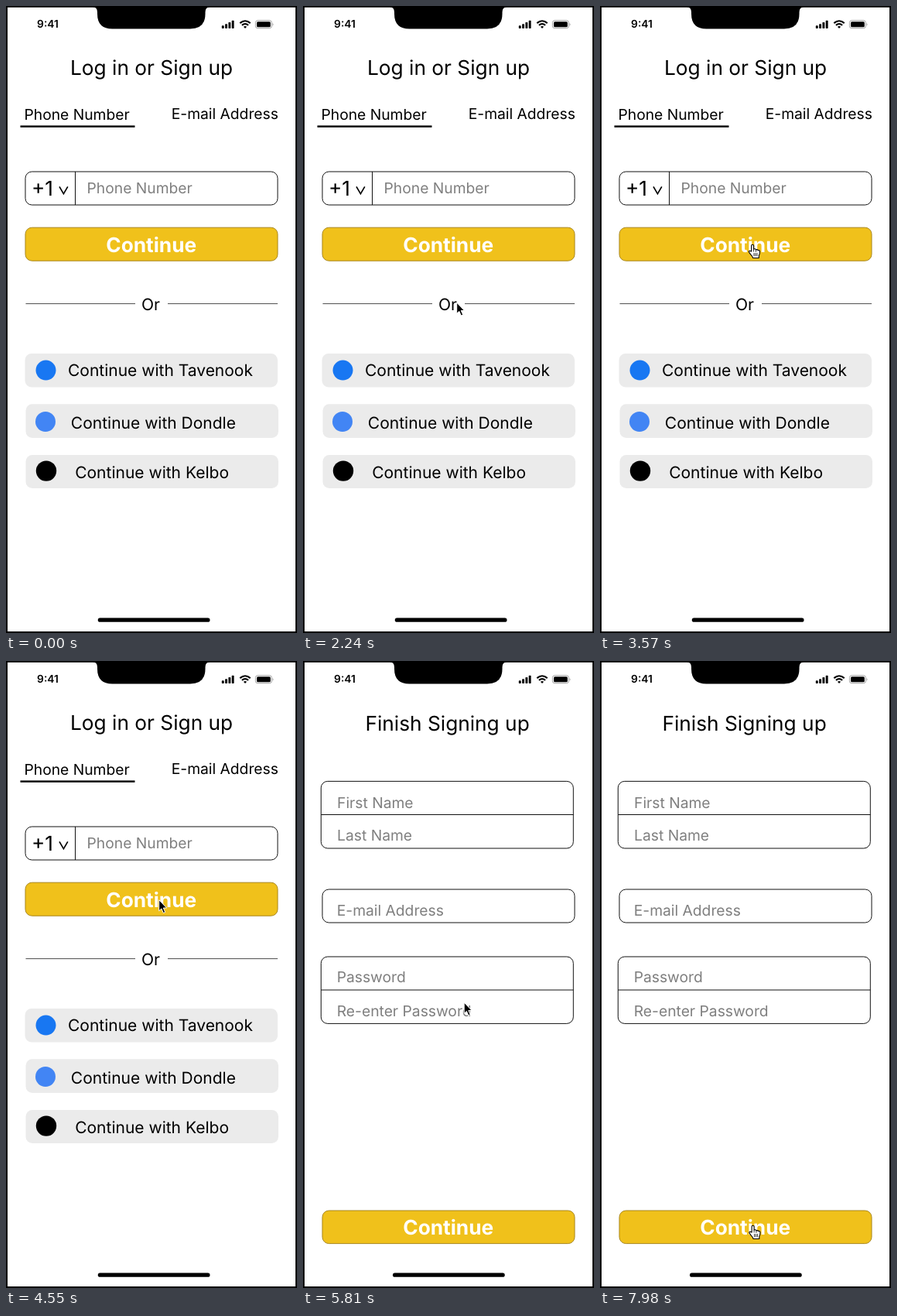
An HTML page for the animation above (8 s loop, 376 by 810 pixels).

```html
<!DOCTYPE html>
<html lang="en">
<head>
<meta charset="utf-8">
<title>Log in or Sign up</title>
<style>
  html, body { margin: 0; width: 100%; height: 100%; overflow: hidden; background: #fff; }
  svg { display: block; width: 376px; height: 810px; }
  text { font-family: Inter, Roboto, sans-serif; font-optical-sizing: none; text-anchor: middle; text-rendering: geometricPrecision; }
  .title { font-size: 26.25px; }
  .label { font-size: 19.25px; }
  .hint { font-size: 19.25px; fill: #7f7f7f; }
  .body { font-size: 21px; }
  .cta { font-size: 26.25px; font-weight: 700; fill: #fff; }
  .clock { font-size: 13.8px; font-weight: 600; }
  .box { fill: #fff; stroke: #111; stroke-width: 1; }
  .line { fill: none; stroke: #111; stroke-width: 1; }
  .gold { fill: #f0c11b; stroke: #a8861c; stroke-width: 1; }
  .soft { fill: #ebebeb; }
</style>
</head>
<body>
<svg viewBox="0 0 376 810" xmlns="http://www.w3.org/2000/svg">
  <rect width="376" height="810" fill="#fff"/>

  <g id="login">
    <text class="title" x="188.1" y="89.2">Log in or Sign up</text>
    <text class="label" x="91.6" y="146.9">Phone Number</text>
    <text class="label" x="282.8" y="145.9">E-mail Address</text>
    <rect x="18.5" y="154.4" width="148" height="2.4"/>

    <rect class="box" x="25" y="214" width="326" height="43" rx="8.5"/>
    <path class="line" d="M89.5 214V257"/>
    <text class="title" x="47" y="245.4">+1</text>
    <path d="M69 233.4L74.4 242.6L79.8 233.4" fill="none" stroke="#000" stroke-width="1.7"/>
    <text class="hint" x="172.7" y="241.9">Phone Number</text>

    <rect class="gold" x="25" y="286.2" width="326" height="43" rx="8.5"/>
    <text class="cta" x="187.7" y="317.5">Continue</text>

    <path d="M25.5 384.6H167M209 384.6H351" stroke="#4a4a4a" stroke-width="1"/>
    <text class="body" x="187" y="393.3">Or</text>

    <rect class="soft" x="24.5" y="449" width="326.5" height="43.5" rx="8.5"/>
    <circle cx="51.5" cy="470.6" r="13" fill="#1877f2"/>
    <text class="body" x="199.5" y="478">Continue with Tavenook</text>

    <rect class="soft" x="25.5" y="514.3" width="326.5" height="43.7" rx="8.5"/>
    <circle cx="51" cy="537" r="13" fill="#4285f4"/>
    <text class="body" x="190.4" y="545.7">Continue with Dondle</text>

    <rect class="soft" x="25.5" y="580" width="326.5" height="43" rx="8.5"/>
    <circle cx="52" cy="600.6" r="13.2" fill="#000"/>
    <text class="body" x="188.6" y="609.6">Continue with Kelbo</text>

    <rect x="118.8" y="790.6" width="144.7" height="5.2" rx="2.6"/>
  </g>

  <g id="finish">
    <text class="title" x="186.6" y="90">Finish Signing up</text>

    <rect class="box" x="23.3" y="155.4" width="326" height="86.6" rx="8.5"/>
    <path class="line" d="M23.3 198.5H349.3"/>
    <text class="hint" x="93.3" y="190.1">First Name</text>
    <text class="hint" x="92.6" y="232">Last Name</text>

    <rect class="box" x="25" y="295" width="326" height="43" rx="8.5"/>
    <text class="hint" x="112.8" y="328.8">E-mail Address</text>

    <rect class="box" x="23.3" y="382" width="326" height="86.4" rx="8.5"/>
    <path class="line" d="M23.3 425H349.3"/>
    <text class="hint" x="88.2" y="414.9">Password</text>
    <text class="hint" x="130.7" y="458.6">Re-enter Password</text>

    <rect class="gold" x="25" y="710" width="326" height="42.6" rx="8.5"/>
    <text class="cta" x="187.7" y="741.3">Continue</text>

    <rect x="116" y="790.6" width="144.7" height="5.2" rx="2.6"/>
  </g>

  <!-- phone frame and status bar -->
  <rect x="1" y=".8" width="374" height="808.2" fill="none" stroke="#000" stroke-width="2"/>
  <path d="M112 1Q118 1.5 118 8V10Q118 29.6 137.5 29.6H238Q257.5 29.6 257.5 10V8Q257.5 1.5 263.5 1Z"/>
  <text class="clock" x="54" y="28.4">9:41</text>
  <g>
    <rect x="278.8" y="25.2" width="2.9" height="3.8" rx=".7"/>
    <rect x="283.1" y="23.2" width="2.9" height="5.8" rx=".7"/>
    <rect x="287.4" y="21" width="2.9" height="8" rx=".7"/>
    <rect x="291.7" y="18.7" width="2.9" height="10.3" rx=".7"/>
  </g>
  <g fill="none" stroke="#000" stroke-width="2.1">
    <path d="M302.3 22.1Q309 16.4 315.7 22.1"/>
    <path d="M304.9 24.9Q309 21.5 313.1 24.9"/>
  </g>
  <path d="M306.9 26.8Q309 25.2 311.1 26.8L309 29.1Z"/>
  <rect x="322.4" y="18.7" width="21" height="10" rx="2.8" fill="none" stroke="#a2a2a2" stroke-width="1"/>
  <rect x="324" y="20.2" width="17.8" height="7" rx="1.5"/>
  <path d="M344.6 21.9Q346.6 23.7 344.6 25.5Z" fill="#a2a2a2"/>

  <g id="pointer">
    <ellipse id="ring" cx="1" cy=".6" rx="31.5" ry="29" fill="none" stroke="#333" stroke-opacity=".65" stroke-width="2.5"/>
    <path id="arrow" d="M.7 .2V14.3L3.9 11.4L6.3 17L8.7 16L6.3 10.5H10.6Z" fill="#000" stroke="#fff" stroke-width="1" stroke-linejoin="round"/>
    <g id="hand" stroke="#000" stroke-linejoin="round" stroke-linecap="round">
      <path d="M-1.4 8.6V1.3a1.5 1.5 0 0 1 3 0V5.6q2.2-.9 2.8 .7q2.2-.7 2.7 .8q2.2-.5 2.4 1.6q.1 3.4-1.2 5.4V17H.6q-.6-2.2-2.8-4.4L-4.6 9.4q-.2-2 1.6-1.5Z" fill="#fff" stroke-width="1.1"/>
      <path d="M1.6 5.8V8.6M4.4 6.6V8.9M2 11V14.4M4 11V14.4M6 11V14.4" fill="none" stroke-width=".8"/>
    </g>
  </g>
</svg>
<script>
const LOOP = 8000, STEP = 70;
const el = id => document.getElementById(id);

// pointer path: time, x, y
const path = [
  [1190, 321, 592], [1260, 289, 536], [1330, 262, 490], [1400, 243, 459], [1540, 225, 431], [1610, 221.5, 427],
  [1960, 221.5, 427], [2030, 219, 422], [2240, 198, 383], [2450, 196, 357], [2800, 197.5, 328],
  [2870, 202, 312], [3010, 201.5, 307], [3290, 201.5, 307], [3430, 199, 306.5], [3570, 197, 308.5],
  [5250, 197, 308.5], [5320, 198, 312], [5390, 202, 324], [5530, 211.5, 356], [5600, 213.5, 376],
  [5810, 207.5, 441], [5950, 203.5, 482], [6090, 200, 516],
  [6230, 199, 551], [6370, 197, 634], [6510, 196, 682],
  [6720, 196, 682], [6860, 197, 702], [7000, 198, 721.5], [7280, 197.5, 729.5], [LOOP, 197.5, 729.5]
];

const within = (t, a, b) => t >= a && t < b;
const show = (id, on) => el(id).setAttribute('visibility', on ? 'visible' : 'hidden');

function locate(t) {
  const i = Math.max(1, path.findIndex(p => p[0] >= t));
  const [t0, x0, y0] = path[i - 1], [t1, x1, y1] = path[i];
  const k = Math.max(0, (t - t0) / (t1 - t0));
  return [x0 + (x1 - x0) * k, y0 + (y1 - y0) * k];
}

function draw(ms) {
  const t = Math.floor((ms % LOOP) / STEP) * STEP;
  const second = t >= 4620, seen = t >= 1190;
  const hand = within(t, 2800, 4550) || t >= 6930;
  show('login', !second);
  show('finish', second);
  show('arrow', seen && !hand);
  show('hand', hand);
  show('ring', within(t, 4410, 4550) || within(t, 7840, 7980));
  el('pointer').setAttribute('transform', `translate(${locate(t)})`);
}

const start = performance.now();
function tick(now) {
  draw(Math.max(0, now - start));
  requestAnimationFrame(tick);
}
draw(0);
requestAnimationFrame(tick);
</script>
</body>
</html>
```
